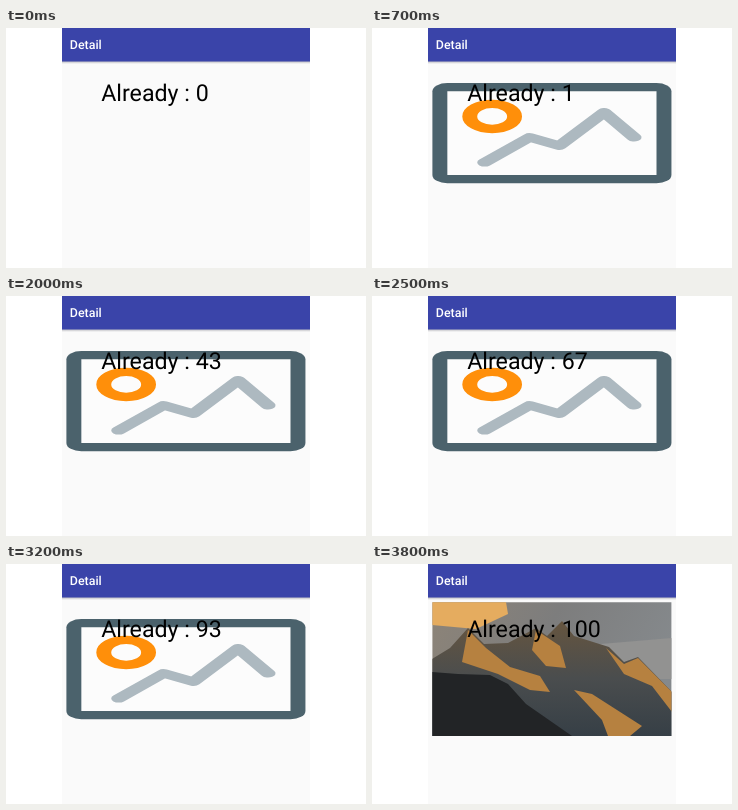
Recreate the animation shown at these times as an HTML page. Size 360 px wide and 240 px high, loop 5 s.

```html
<!DOCTYPE html>
<html lang="en">
<head>
<meta charset="utf-8">
<title>Detail</title>
<style>
html, body { margin: 0; width: 100%; height: 100%; overflow: hidden; background: #fff; }
svg { display: block; width: 360px; height: 240px; }
text { font-family: Roboto, Arial, sans-serif; white-space: pre; text-rendering: geometricPrecision; }
</style>
</head>
<body>
<svg viewBox="0 0 360 240">
  <defs>
    <linearGradient id="shade" x2="0" y2="1">
      <stop stop-color="#b4b4ba"/><stop offset="1" stop-color="#fafafa"/>
    </linearGradient>
    <linearGradient id="sky" x2="1" y2=".3">
      <stop stop-color="#8d8478"/><stop offset=".5" stop-color="#7d7d7d"/><stop offset="1" stop-color="#85898c"/>
    </linearGradient>
    <linearGradient id="rock" x2="0" y2="1">
      <stop stop-color="#66553f"/><stop offset=".5" stop-color="#4a4d4e"/><stop offset="1" stop-color="#363f46"/>
    </linearGradient>
    <clipPath id="crop"><path d="M60.4 38.2H299.4V172H60.4Z"/></clipPath>
  </defs>

  <path fill="#fafafa" d="M56 0H304V240H56Z"/>
  <path fill="url(#shade)" d="M56 33H304V36H56Z"/>
  <path fill="#3a44a9" d="M56 0H304V33.4H56Z"/>
  <text x="63.8" y="21" font-size="12.4" font-weight="500" fill="#fff">Detail</text>

  <!-- placeholder icon on a 16 x 12 grid, stretched to the view -->
  <g id="icon" transform="translate(60.4 55) scale(14.94 8.36)">
    <rect width="16" height="12" rx="1" fill="#4b626c"/>
    <path fill="#fcfcfc" d="M1 1H15V11H1Z"/>
    <circle cx="4" cy="4" r="1.5" fill="none" stroke="#ff8f0a"/>
    <path d="M3.5 9.5L6.5 6.5L8.5 7.5L11.5 3.5L13.5 6.5" fill="none" stroke="#adb9c0"
      stroke-linecap="round" stroke-linejoin="round"/>
  </g>

  <!-- photo as flat shapes: sky, clouds, rock, sunlit ridges, dark foreground -->
  <g id="photo" clip-path="url(#crop)">
    <path fill="url(#sky)" d="M60 38H300V172H60Z"/>
    <path fill="#e5ac5f" d="M60 38H134L136 50L104 65L60 61Z"/>
    <path fill="#929291" d="M205 82L300 74V115H240Z"/>
    <path fill="url(#rock)" d="M60 95L78 84L96 64L112 80L136 79L164 64L175 72L190 57L202 72L237 83L252 98L266 93L300 128V172H60Z"/>
    <path fill="#b68140" d="M96 66L90 98L126 110L158 126L178 128L168 112L138 103L114 84ZM164 66L160 86L174 102L194 104L188 82ZM234 84L252 110L280 122L300 148V128L266 94L252 100ZM202 126L220 130L270 162L258 172H236L230 156Z"/>
    <path fill="#222426" d="M60 108L86 110L118 111L136 120L154 140L200 172H60Z"/>
  </g>

  <text id="label" x="95.2" y="73" font-size="23.2"></text>
</svg>
<script>
const LOOP = 5000, COUNT_FROM = 700, PHOTO_FROM = 3800;
const [icon, photo, label] = ['icon', 'photo', 'label'].map(id => document.getElementById(id));

// The counter repaints slowly at first, then every 100 ms.
function repaintTime(t) {
  if (t >= 1800) return Math.min(3600, Math.floor(t / 100) * 100);
  return [1600, 1500, 1300, 1000, 700].find(s => t >= s);
}

// Accelerate, then decelerate from 0 to 100.
function countAt(t) {
  if (t < COUNT_FROM) return 0;
  const x = Math.min(1, (repaintTime(t) - 562) / 3180);
  return Math.max(1, Math.round(50 - 50 * Math.cos(Math.PI * x)));
}

function show(el, on) {
  el.style.display = on ? '' : 'none';
}

const start = performance.now();
function draw() {
  const t = (performance.now() - start) % LOOP;
  show(icon, t >= COUNT_FROM && t < PHOTO_FROM);
  show(photo, t >= PHOTO_FROM);
  label.textContent = 'Already : ' + countAt(t);
  requestAnimationFrame(draw);
}
draw();
</script>
</body>
</html>
```
